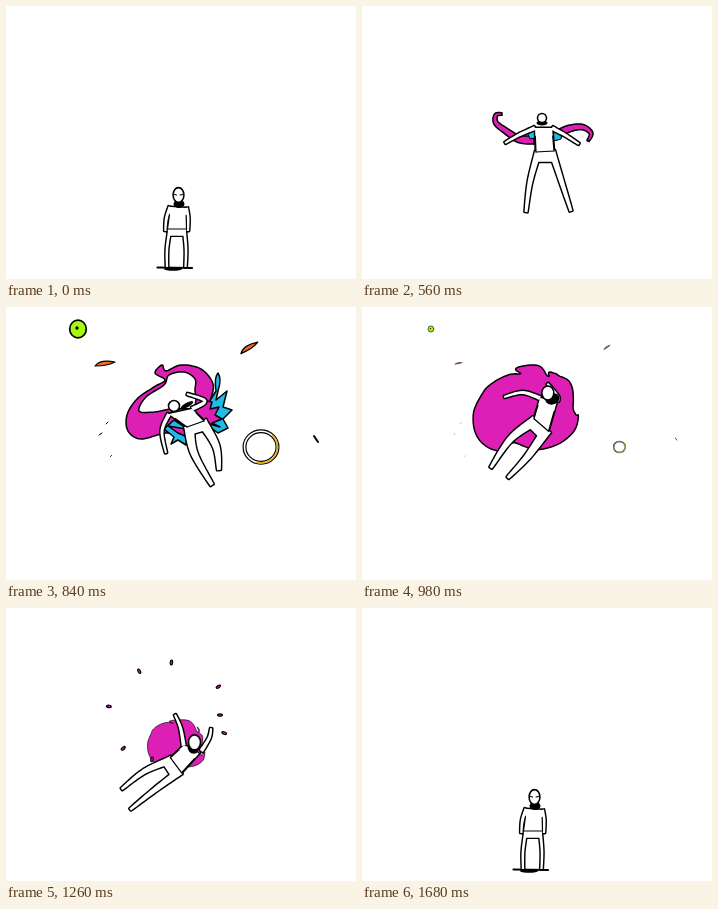
An HTML page with a canvas that plays this animation: 350 px wide and 273 px high, repeating every 1.75 s.

```html
<!DOCTYPE html>
<html>
<head>
<meta charset="utf-8">
<style>
html, body { margin: 0; height: 100%; overflow: hidden; background: #fff; }
canvas { display: block; }
</style>
</head>
<body>
<canvas id="stage" width="350" height="273"></canvas>
<script>
const ctx = document.getElementById('stage').getContext('2d');
const PINK = '#dd1fb6', CYAN = '#20bce8', STEP = 70, STEPS = 25;

const lerp = (a, b, u) => a + (b - a) * u;
const mixPt = (a, b, u) => [lerp(a[0], b[0], u), lerp(a[1], b[1], u)];
const pairs = list => list.reduce((out, v, i) => (i % 2 ? out[out.length - 1].push(v) : out.push([v]), out), []);

// joints: shoulders L R, hips R L, elbow+hand L, elbow+hand R, knee+foot L, knee+foot R, head, beard
// sizes: head rx ry, beard rx ry angle, thigh, ankle
const pose = (joints, size) => ({ p: pairs(joints), size });
const stand = pose([164.5, 201, 180, 202, 180.5, 223, 161.5, 223, 160.5, 212, 159.3, 225, 182, 212, 182, 225,
  161, 243, 161, 261, 180, 243, 179.5, 261, 172.5, 189, 173, 198], [5.4, 7.4, 5.5, 4, 0, 1.5, 1.1]);
const crouch = pose([167, 215, 186, 217, 182, 230, 164, 229, 152, 213, 138, 210, 196, 209, 205, 199,
  166, 244, 166, 259, 184, 240, 173, 256, 179, 216, 180, 212], [5, 7, 13, 3, -.3, 3.5, 1.5]);
const jump = pose([173, 122, 190, 122, 192, 145, 174, 146, 157, 129, 143, 137, 203, 129, 217, 138,
  168, 176, 164, 206, 200, 177, 209, 205, 180, 112, 180, 117], [4.5, 4.5, 5.5, 2.5, 0, 3.3, 1.4]);
const fly = pose([163, 107, 186, 102, 198, 114, 181, 120, 156, 124, 160, 146, 199, 94, 181, 87,
  188, 146, 206, 178, 210, 139, 213, 163, 168, 99, 181, 98], [5.5, 5.5, 7, 2.2, -.5, 5, 1.8]);
const curl = pose([192, 108, 212, 121, 167, 129, 171, 109, 196, 88, 192, 70, 224, 103, 222, 83,
  140, 95, 106, 90, 130, 119, 95, 114, 205, 109, 206, 112], [6.5, 8.5, 7.5, 9, 0, 5, 1]);
const fall = pose([164, 180, 181, 183, 180, 196, 162, 195, 156, 165, 149, 151, 192, 169, 203, 154,
  159, 222, 158, 246, 177, 224, 176, 251, 173, 174, 174, 182], [5.5, 6.5, 5, 5, 0, 2.5, 1.4]);

function frameOf({ p }) {
  const hip = mixPt(p[2], p[3], .5), chest = mixPt(p[0], p[1], .5);
  return { hip, angle: Math.atan2(chest[1] - hip[1], chest[0] - hip[0]) };
}
function rotate([x, y], a) {
  const c = Math.cos(a), s = Math.sin(a);
  return [x * c - y * s, x * s + y * c];
}
// Blends two poses in the torso's own frame so that limbs keep their length while turning.
function blend(a, b, u) {
  const fa = frameOf(a), fb = frameOf(b);
  const hip = mixPt(fa.hip, fb.hip, u), angle = lerp(fa.angle, fb.angle, u);
  const local = (q, f) => rotate([q[0] - f.hip[0], q[1] - f.hip[1]], -f.angle);
  return {
    p: a.p.map((q, i) => {
      const r = rotate(mixPt(local(q, fa), local(b.p[i], fb), u), angle);
      return [r[0] + hip[0], r[1] + hip[1]];
    }),
    size: a.size.map((v, i) => lerp(v, b.size[i], u))
  };
}
const keys = [[0, stand], [1, blend(stand, crouch, .08)], [4, crouch], [8, jump], [12, fly], [16, curl],
  [20, fall], [22, blend(stand, crouch, .5)], [24, stand], [25, stand]];
function poseAt(step) {
  const i = keys.findIndex(k => k[0] > step), [t0, a] = keys[i - 1], [t1, b] = keys[i];
  return blend(a, b, (step - t0) / (t1 - t0));
}

// Catmull-Rom samples through the given points
function curve(pts, closed, count) {
  const n = pts.length, spans = closed ? n : n - 1;
  const at = i => closed ? pts[(i + n) % n] : pts[Math.max(0, Math.min(n - 1, i))];
  return Array.from({ length: count + 1 }, (_, k) => {
    const t = k / count * spans, i = Math.min(spans - 1, Math.floor(t)), u = t - i;
    const [a, b, c, d] = [at(i - 1), at(i), at(i + 1), at(i + 2)];
    return [0, 1].map(j => b[j] + u / 2 * (c[j] - a[j] +
      u * (2 * a[j] - 5 * b[j] + 4 * c[j] - d[j] + u * (3 * (b[j] - c[j]) + d[j] - a[j]))));
  });
}
function polygon(pts) {
  const path = new Path2D();
  pts.forEach(q => path.lineTo(q[0], q[1]));
  path.closePath();
  return path;
}
// Tapered ribbon around a line of samples
function ribbon(pts, r0, r1) {
  const left = [], right = [], n = pts.length - 1;
  pts.forEach(([x, y], i) => {
    const a = pts[Math.max(0, i - 1)], b = pts[Math.min(n, i + 1)];
    const dx = b[0] - a[0], dy = b[1] - a[1], k = lerp(r0, r1, i / n) / (Math.hypot(dx, dy) || 1);
    left.push([x - dy * k, y + dx * k]);
    right.unshift([x + dy * k, y - dx * k]);
  });
  return polygon([...left, ...right]);
}
function ink(path, fill, width = 1.5) {
  ctx.lineWidth = width;
  ctx.fillStyle = fill;
  ctx.fill(path);
  ctx.stroke(path);
}
function line(x0, y0, x1, y1, width = 1.4, color = '#000') {
  ctx.lineWidth = width;
  ctx.strokeStyle = color;
  ctx.beginPath();
  ctx.moveTo(x0, y0);
  ctx.lineTo(x1, y1);
  ctx.stroke();
  ctx.strokeStyle = '#000';
}
function oval(x, y, rx, ry, angle = 0) {
  const path = new Path2D();
  path.ellipse(x, y, rx, ry, angle, 0, 7);
  return path;
}
// Runs draw scaled about one point and moved to another
function placed(from, to, scale, draw) {
  ctx.save();
  ctx.translate(...to);
  ctx.scale(scale, scale);
  ctx.translate(-from[0], -from[1]);
  draw();
  ctx.restore();
}

function drawBody({ p, size }, eyes) {
  const [hrx, hry, brx, bry, turn, thigh, ankle] = size;
  const [sL, sR, hR, hL, eL, handL, eR, handR, kL, fL, kR, fR, head, beard] = p;
  const legL = curve([mixPt(hL, hR, .12), kL, fL], false, 20);
  const legR = curve([mixPt(hR, hL, .12), kR, fR], false, 20);
  const parts = [
    polygon([sL, sR, hR, hL]), polygon([hL, hR, legR[4], legL[4]]),
    ribbon(legL, thigh, ankle), ribbon(legR, thigh, ankle),
    ribbon(curve([sL, eL, handL], false, 16), 2, 1),
    ribbon(curve([sR, eR, handR], false, 16), 2, 1)
  ];
  ctx.lineWidth = 2.9;
  parts.forEach(part => ctx.stroke(part));
  ctx.fillStyle = '#fff';
  parts.forEach(part => ctx.fill(part));
  line(...hL, ...hR, 1.2);
  line(...mixPt(sL, hL, .35), ...hL, 1.2);
  line(...mixPt(sR, hR, .35), ...hR, 1.2);
  ctx.fillStyle = '#000';
  ctx.fill(oval(...beard, brx, bry, turn));
  ink(oval(...head, hrx, hry), '#fff', 1.6);
  if (eyes) {
    line(head[0] - 4, head[1] - .5, head[0] - 2, head[1], 1.1);
    line(head[0] + 1.5, head[1], head[0] + 4, head[1] - .5, 1.1);
  }
}

function drawShadow({ p }) {
  const k = Math.min(1, 1 - (261 - Math.max(p[9][1], p[11][1])) / 11);
  if (k <= 0) return;
  line(168 - 16.5 * k, 261.5, 168 + 18 * k, 262, 2.2);
  ctx.fillStyle = '#000';
  ctx.fill(oval(167, 263, 9 * k, 1.8));
}

const tentacles = [
  [172, 134, 157, 133, 144, 125, 134, 117, 134, 109, 140, 108],
  [193, 130, 206, 123, 220, 121, 229, 127, 226, 135]
].map(t => curve(pairs(t), false, 40));

function drawTentacles(grow) {
  tentacles.forEach(t => ink(ribbon(t.slice(0, 2 + Math.round(39 * grow)), 4.2, 1.2), PINK));
  ink(new Path2D('M173 124L165 126L168 133L173 132ZM192 124L200 126L199 133L192 135Z'), CYAN, 1);
}

const wing = curve(pairs([180, 128, 160, 126, 135, 132, 122, 124, 121, 108, 131, 92, 148, 80, 159, 73, 149, 66,
  156, 58, 160, 64, 175, 58, 195, 62, 207, 77, 204, 94, 198, 108]), true, 160);
const gap = polygon(curve(pairs([133, 104, 140, 90, 158, 78, 163, 68, 178, 65, 189, 72, 189, 84, 190, 100,
  165, 102, 148, 105]), true, 80));
const ball = curve(pairs([175, 157, 157, 152, 142, 145, 140, 150, 145, 156, 128, 153, 113, 142, 104, 125, 102, 105,
  105, 93, 110, 82, 114, 73, 127, 63, 145, 57, 159, 59, 150, 55, 163, 52, 190, 52, 203, 60, 212, 77, 216, 76,
  212, 67, 217, 73, 217, 80, 224, 87, 224, 100, 219, 114, 215, 125, 222, 129, 229, 122, 228, 135, 222, 145,
  205, 154]), true, 160);
const spikes = new Path2D('M205 92L210 84Q208 70 212 66Q216 72 212 84L210 93L221 84L217 100L226 103L217 112' +
  'L222 121L212 126L204 120L195 112ZM158 122L168 113L182 122L180 138L172 133L165 137L168 130Z');
const zigzag = new Path2D('M190 92L206 95L204 102L213 100L209 108L216 112L206 116L214 120L200 116L188 108Z' +
  'M162 119L180 122L179 129L172 126Z');
const flame = new Path2D('M156 140Q172 137 184 138L195 136L189 141L193 143Q184 143 180 146Q174 142 156 140Z');

function drawWing(holeScale) {
  ink(polygon(wing), PINK);
  placed([165, 88], [165, 88], holeScale, () => ink(gap, '#fff'));
  ink(spikes, CYAN);
  ink(zigzag, PINK);
}

function drawCape(step, chest) {
  if (step > 4 && step < 10) placed([181.5, 122], chest, 1, () => drawTentacles(Math.min(1, (step - 4) / 4)));
  if (step > 8 && step < 13) placed([174.5, 104.5], chest, 1 - (12 - step) * .18, () => drawWing(1));
  if (step > 12 && step < 17) {
    const u = (step - 12) / 4;
    if (step < 14) ink(spikes, CYAN);
    ink(polygon(wing.map((q, i) => mixPt(q, ball[i], u))), PINK);
    if (step < 14) placed([165, 88], [165, 88], .6, () => ink(gap, '#fff'));
    if (step > 14) ink(flame, '#fff', 1.2);
  }
  if (step === 17 || step === 18) {
    placed([202, 114.5], chest, step === 17 ? .8 : .45, () => ink(polygon(ball), PINK));
  }
}

// Small things thrown outwards while the cape opens
function drawDebris(step) {
  const i = step - 10;
  if (i < 0 || i > 4) return;
  const reach = [.5, .8, 1, 1.02, 1.03][i], scale = [.6, .85, 1, .7, .35][i];
  const thrown = (x, y, draw) =>
    placed([0, 0], [lerp(175, x, reach), lerp(105, y, Math.min(1, reach))], scale, draw);
  thrown(72, 22, () => {
    ink(oval(0, 0, 8.3, 8.8), '#a5f712', 1.7);
    ctx.fillStyle = '#000';
    ctx.fill(oval(-1, -1, 1.6, 1.8));
  });
  const leaf = new Path2D('M-10 3Q-5 -4 10 -1Q3 3 -10 3Z');
  thrown(99, 56, () => ink(leaf, '#f36b21', 1.2));
  thrown(243, 40, () => { ctx.rotate(-.4); ink(leaf, '#f36b21', 1.2); });
  thrown(255, 140, () => {
    ctx.lineWidth = 4;
    ctx.stroke(oval(0, 0, 16.5, 15.8));
    ctx.lineWidth = 1.6;
    ctx.strokeStyle = '#fff';
    ctx.stroke(oval(0, 0, 16.5, 15.8));
    ctx.strokeStyle = '#e9ad18';
    ctx.beginPath();
    ctx.ellipse(0, 0, 16.5, 15.8, 0, -.8, 1.8);
    ctx.stroke();
    ctx.strokeStyle = '#000';
  });
  thrown(310, 132, () => line(-2, -3, 2, 3, 2));
  thrown(101, 116, () => line(-1, 1, 1, -1, 1));
  thrown(95, 127, () => line(-2, 1, 1, -1, 1));
  thrown(105, 149, () => line(-.5, .5, .5, -.5, 1));
}

// Scraps left when the cape bursts
function drawScraps(step) {
  if (step > 16 && step < 20) {
    const age = step - 16;
    for (let i = 0; i < 9; i++) {
      const a = i * 2.4, r = 42 + age * 6 + i % 3 * 4, s = 5 - age * 1.3;
      ink(oval(160 + r * Math.cos(a), 107 + r * .85 * Math.sin(a), s, s * .5, a), PINK, 1.2);
    }
  }
  if (step === 20) {
    line(151, 127.5, 155, 130, 3);
    line(151.5, 128, 154, 129.5, 1, PINK);
    line(169.5, 160, 174, 156, 1.7);
  }
}

function render(now) {
  const step = Math.floor(now / STEP) % STEPS, body = poseAt(step);
  ctx.fillStyle = '#fff';
  ctx.fillRect(0, 0, 350, 273);
  ctx.strokeStyle = '#000';
  ctx.lineCap = ctx.lineJoin = 'round';
  drawShadow(body);
  drawCape(step, mixPt(body.p[0], body.p[1], .5));
  drawBody(body, step < 2 || step > 22);
  drawDebris(step);
  drawScraps(step);
}

const start = performance.now();
function tick() {
  render(performance.now() - start);
  requestAnimationFrame(tick);
}
tick();
</script>
</body>
</html>
```
